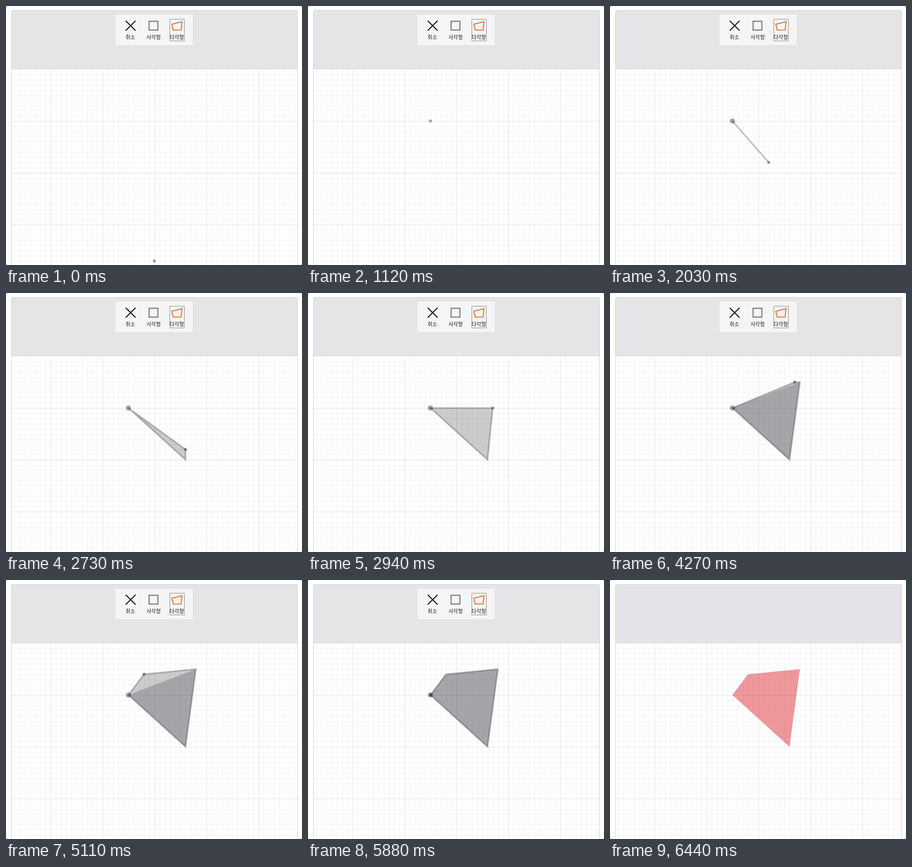
Write an HTML page with a canvas that moves like this. It is 570x500 px and loops after 7.84 s.

```html
<!DOCTYPE html>
<html lang="ko">
<head>
<meta charset="utf-8">
<title>Polygon tool</title>
<style>
  html, body { margin: 0; width: 100%; height: 100%; overflow: hidden; background: #555; }
  canvas { display: block; }
</style>
</head>
<body>
<canvas id="stage" width="570" height="500"></canvas>
<script>
const ctx = document.getElementById('stage').getContext('2d');
const LOOP = 7840, STEP = 70, FINISH = 6440, CELL = 10;

// The cursor leaves for each stop, arrives, and later clicks there
const start = { x: 286, y: 492 };
const stops = [
  { x: 236, y: 222, leave: 700, arrive: 1120, click: 1610 },
  { x: 346, y: 322, leave: 1750, arrive: 2100, click: 2310 },
  { x: 366, y: 172, leave: 2660, arrive: 3080, click: 3920 },
  { x: 266, y: 182, leave: 4060, arrive: 4620, click: 5390 },
  { x: 236, y: 222, leave: 5740, arrive: 5880, click: FINISH }
];

// Moves keep to the grid; x eases in while y runs evenly
function cursorAt(t) {
  let { x, y } = start;
  for (const stop of stops) {
    const k = Math.min(1, Math.max(0, (t - stop.leave) / (stop.arrive - stop.leave)));
    x += Math.round((stop.x - x) * k * k / CELL) * CELL;
    y += Math.round((stop.y - y) * k / CELL) * CELL;
  }
  return { x, y };
}

function shape(points, fill, stroke, width) {
  ctx.beginPath();
  for (const { x, y } of points) ctx.lineTo(x, y);
  ctx.closePath();
  ctx.fillStyle = fill;
  ctx.fill();
  if (stroke) {
    ctx.strokeStyle = stroke;
    ctx.lineWidth = width;
    ctx.stroke();
  }
}

function dot({ x, y }, radius) {
  ctx.fillStyle = 'rgba(0,0,0,.35)';
  ctx.beginPath();
  ctx.arc(x, y, radius, 0, Math.PI * 2);
  ctx.fill();
}

function box(x, y, width, height, color, corners = 0) {
  ctx.fillStyle = color;
  ctx.beginPath();
  ctx.roundRect(x, y, width, height, corners);
  ctx.fill();
}

function icon(path, color, width = 2) {
  ctx.strokeStyle = color;
  ctx.lineWidth = width;
  ctx.stroke(new Path2D(path));
}

function gridLines(gap, color) {
  for (let x = 86 % gap + (gap > 86 ? 0 : CELL); x < 561; x += gap) box(x, 122, 1, 378, color);
  for (let y = 122 + gap; y < 500; y += gap) box(11, y, 550, 1, color);
}

function drawBoard(done) {
  ctx.clearRect(0, 0, 570, 500);
  box(0, 0, 570, 500, '#fff', 2);
  gridLines(CELL, '#f3f3f3');
  gridLines(CELL * 10, '#e3e3e3');
  box(10, 8, 552, 113, done ? '#e4e3e8' : '#e5e5e7', [4, 4, 0, 0]);
  box(10, 121, 552, 1, '#d6d6d8');
  ctx.strokeStyle = '#d3d3d5';
  ctx.lineWidth = 1;
  ctx.beginPath();
  ctx.roundRect(10.5, 8.5, 551, 520, 4);
  ctx.stroke();
}

function drawToolbar() {
  box(212, 18, 149, 59, '#dddddf');
  box(211, 17, 149, 59, '#f5f5f5');
  icon('M315.5 25.5h28v42h-28z', '#929294', 1);
  icon('M230.5 28.5l19 19m0 -19l-19 19', '#1a1a1a');
  icon('M275.5 29.5h17v17h-17z', '#747474');
  icon('M319.3 35.2L339 30.2L337.2 46.3L322 46.5z', '#e07a3a');

  ctx.fillStyle = '#1a1a1a';
  ctx.font = '10px "Noto Sans CJK KR", "Noto Sans CJK", sans-serif';
  ctx.textAlign = 'center';
  ['취소', '사각형', '다각형'].forEach((label, i) => ctx.fillText(label, 239.5 + i * 44.7, 64));
}

function draw(t) {
  const done = t >= FINISH;
  const corners = stops.slice(0, 4).filter(stop => stop.click <= t);
  drawBoard(done);
  if (!done) drawToolbar();

  ctx.save();
  ctx.translate(-0.3, 0);
  if (done) {
    shape(corners, 'rgba(222,50,58,.5)');
  } else {
    const cursor = cursorAt(t);
    if (corners.length > 2) shape(corners, 'rgba(18,14,38,.2)');
    if (corners.length) {
      shape([...corners, cursor], 'rgba(0,0,0,.2)', 'rgba(0,0,0,.23)', 3.2);
      dot(corners[0], 5);
    }
    dot(cursor, 3);
  }
  ctx.restore();
}

function tick(now) {
  draw(Math.floor((now % LOOP) / STEP) * STEP);
  requestAnimationFrame(tick);
}
requestAnimationFrame(tick);
</script>
</body>
</html>
```
